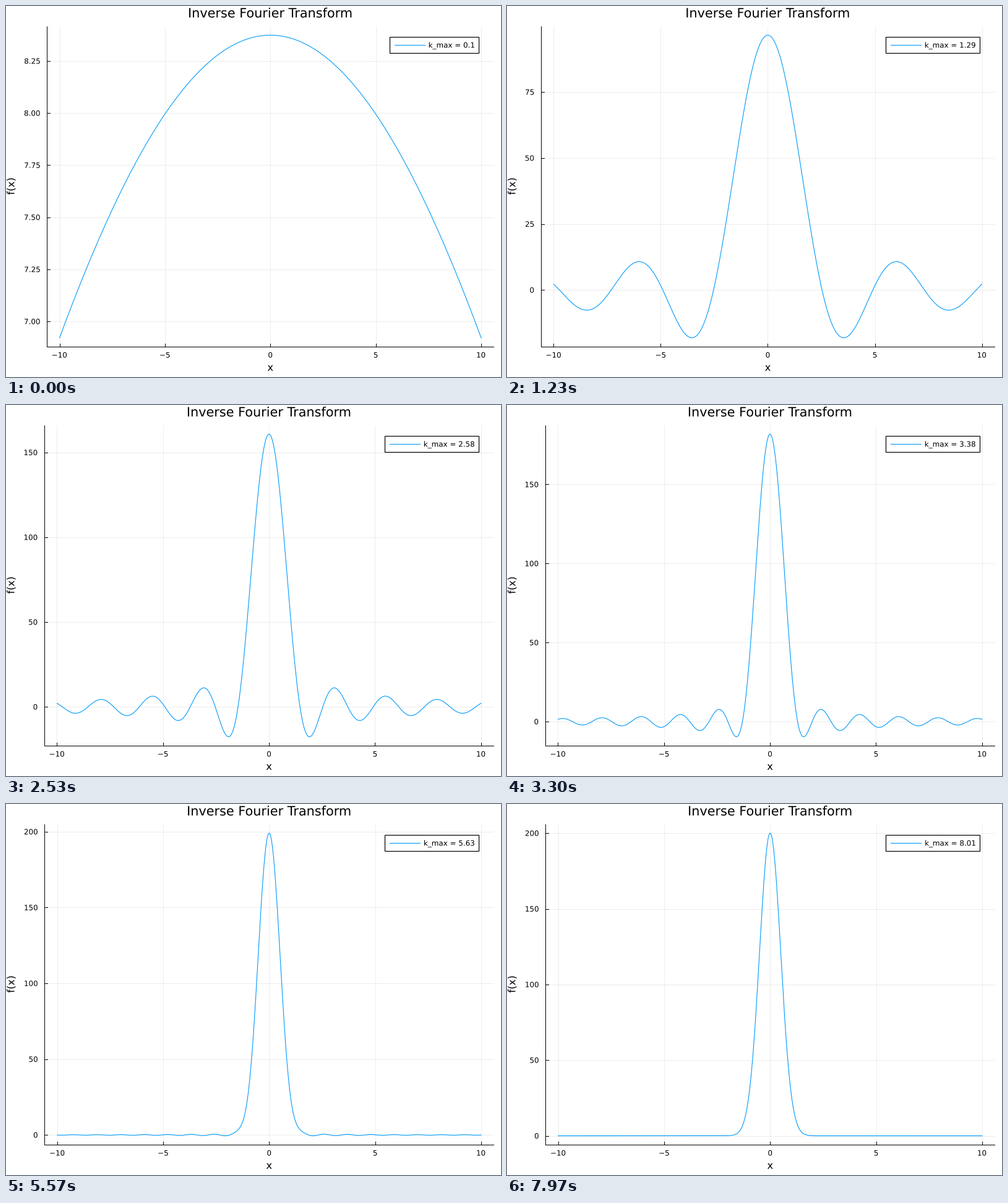
Animation, 800 px wide and 600 px high, one loop 8000 ms. Source, as a matplotlib script:

```python
import math

import numpy as np
import matplotlib.pyplot as plt
from matplotlib.animation import FuncAnimation
from matplotlib.patches import PathPatch, Rectangle
from matplotlib.textpath import TextPath
from matplotlib.transforms import Affine2D

W, H, DPI = 800, 600, 100
FRAMES, LOOP_MS = 240, 8000
TOP, BOTTOM, RIGHT = 32.5, 551.3, 788.3
BLUE = "#009afa"
SMALL, LABEL, TITLE = 11.9, 16.35, 20.8
K_STEP = 0.01

plt.rcParams["font.family"] = "DejaVu Sans"
fig = plt.figure(figsize=(W / DPI, H / DPI), dpi=DPI, facecolor="white")
ax = fig.add_axes([0, 0, 1, 1])

half_x = np.linspace(0, 10, 501)
xs = np.concatenate([-half_x[:0:-1], half_x])
glyphs = {}


def px(width):
    return width * 72 / DPI


def glyph_path(s, size):
    """Outline of a string and its ink extents."""
    if (s, size) not in glyphs:
        path = TextPath((0, 0), s, size=size)
        box = path.get_extents()
        glyphs[s, size] = path, box.x0, box.x1
    return glyphs[s, size]


def ink_width(s, size):
    _, x0, x1 = glyph_path(s, size)
    return x1 - x0


def text(x, baseline, s, size, align=0.5, angle=0):
    path, x0, x1 = glyph_path(s, size)
    shift = x0 + align * (x1 - x0)
    place = Affine2D().translate(-shift, 0).scale(1, -1).rotate_deg(-angle)
    place.translate(x, baseline)
    ax.add_patch(PathPatch(place.transform_path(path), fc="black", lw=0))


def line(x, y, color="black", width=1.0, **kw):
    ax.plot(x, y, color=color, lw=px(width), **kw)


def cutoff(i):
    return 0.1 + i * 9.9 / 299


def inverse_transform(k_max):
    """Truncated sum of a Gaussian spectrum, real part."""
    count = math.floor(2 * k_max / K_STEP + 1e-9) + 1
    k = -k_max + K_STEP * np.arange(count)
    half = np.exp(-k * k / 8) @ np.cos(np.outer(k, half_x))
    half /= math.sqrt(2 * math.pi)
    return np.concatenate([half[:0:-1], half])


def nice_ticks(lo, hi):
    """Best scoring set of 4 to 8 round ticks within the limits."""
    span = hi - lo
    top = math.ceil(math.log10(span))
    best, best_score = [], -math.inf
    for z in range(top, top - 3, -1):
        for q, nice in ((1, 1), (5, 0.9), (2, 0.7), (2.5, 0.5), (3, 0.2)):
            step = q * 10.0 ** z
            first, last = math.ceil(lo / step), math.floor(hi / step)
            n = last - first + 1
            if not 4 <= n <= 8:
                continue
            granularity = 1 - abs(n - 5) / 5
            has_zero = first <= 0 <= last
            coverage = 1.5 * span / ((n - 1) * step)
            score = granularity / 4 + has_zero / 6 + coverage / 3 + nice / 4
            if score > best_score:
                best = [j * step for j in range(first, last + 1)]
                best_score = score
    return best


def tick_labels(ticks):
    digits = 0
    while any(abs(round(t, digits) - t) > 1e-9 for t in ticks):
        digits += 1
    return [f"{t:.{digits}f}".replace("-", "\u2212") for t in ticks]


def legend(k_max):
    label = f"k_max = {round(k_max, 2)}"
    text_x = 756.8 - ink_width(label, SMALL)
    left = text_x - 64
    ax.add_patch(Rectangle((left, 50), 764 - left, 26, fc="white", ec="black",
                           lw=px(1.2), zorder=3))
    line([left + 8, left + 57], [63, 63], BLUE, 1.1, zorder=4)
    path, x0, _ = glyph_path(label, SMALL)
    place = Affine2D().translate(-x0, 0).scale(1, -1).translate(text_x, 67.4)
    ax.add_patch(PathPatch(place.transform_path(path), fc="black", lw=0,
                           zorder=4))


def draw(i):
    ax.clear()
    ax.set(xlim=(0, W), ylim=(H, 0))
    ax.axis("off")

    k_max = cutoff(i)
    f = inverse_transform(k_max)
    pad = 0.03 * (f.max() - f.min())
    lo, hi = f.min() - pad, f.max() + pad
    y_ticks = nice_ticks(lo, hi)
    y_labels = tick_labels(y_ticks)
    x_ticks = [-10, -5, 0, 5, 10]
    left = 41.2 + max(ink_width(s, SMALL) for s in y_labels)

    def to_x(v):
        return left + (v + 10.6) / 21.2 * (RIGHT - left)

    def to_y(v):
        return BOTTOM - (v - lo) / (hi - lo) * (BOTTOM - TOP)

    for v, s in zip(x_ticks, tick_labels(x_ticks)):
        x = to_x(v)
        line([x, x], [TOP, BOTTOM], width=0.7, alpha=0.1)
        line([x, x], [BOTTOM, BOTTOM - 5.2])
        text(x, 568.6, s, SMALL)
    for v, s in zip(y_ticks, y_labels):
        y = to_y(v)
        line([left, RIGHT], [y, y], width=0.7, alpha=0.1)
        line([left, left + 5.2], [y, y])
        text(left - 11.4, y + 4.4, s, SMALL, align=1)
    line([left, left], [TOP, BOTTOM])
    line([left, RIGHT], [BOTTOM, BOTTOM])

    line(to_x(xs), to_y(f), BLUE, 1.1)

    middle = (left + RIGHT) / 2
    text(middle, 18.5, "Inverse Fourier Transform", TITLE)
    text(middle, 590, "x", LABEL)
    text(13.5, (TOP + BOTTOM) / 2, "f(x)", LABEL, angle=90)
    legend(k_max)
    return []


anim = FuncAnimation(fig, draw, frames=FRAMES, interval=LOOP_MS / FRAMES,
                     init_func=lambda: [], repeat=True, repeat_delay=0)
plt.show()
```
